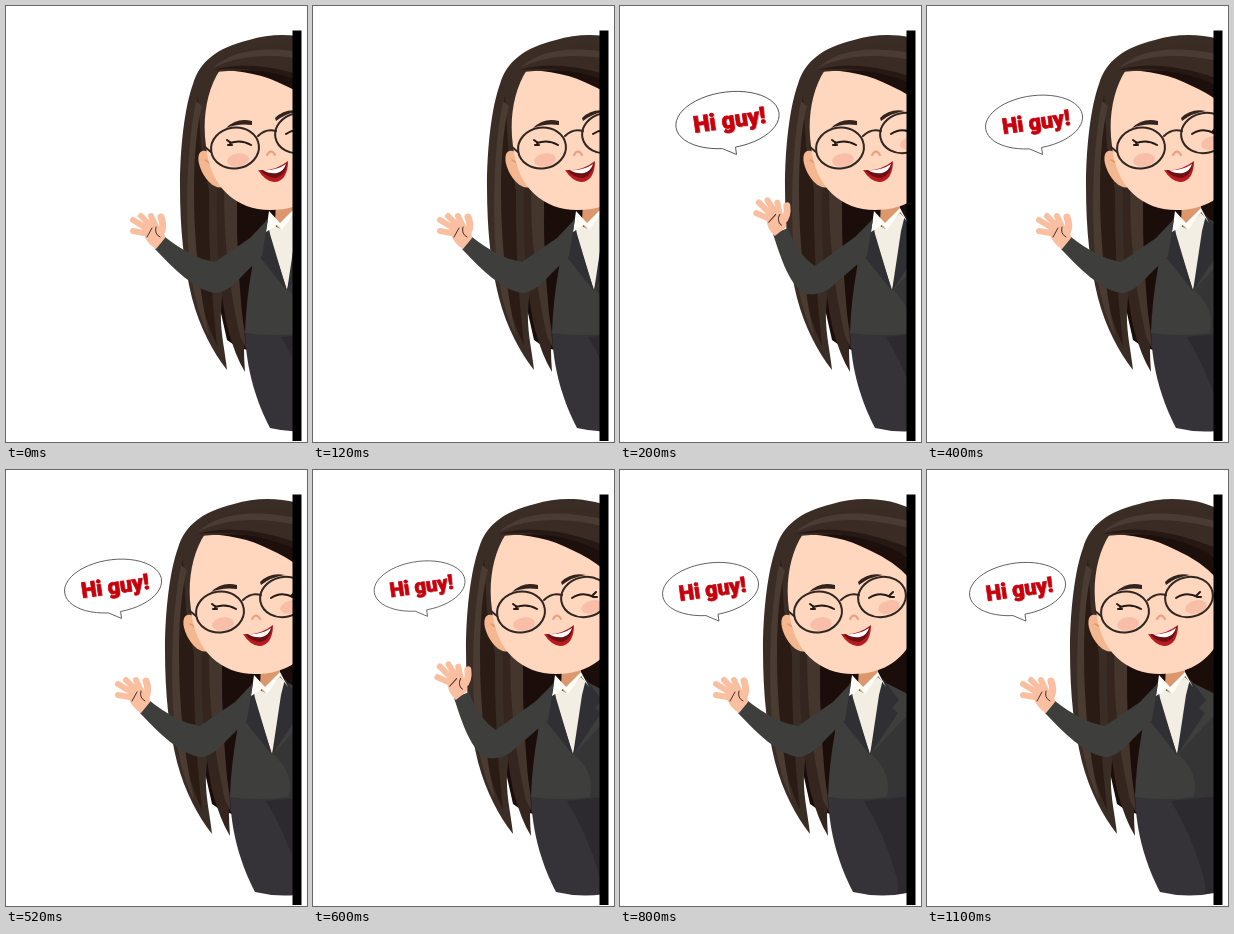
An HTML page for the animation above (1.3 s loop, 301 px wide and 436 px high).

```html
<!DOCTYPE html>
<html lang="en">
<head>
<meta charset="utf-8">
<style>
  html, body { margin: 0; width: 100%; height: 100%; overflow: hidden; background: #fff; }
  svg { display: block; width: 100%; height: 100%; }
  .line { fill: none; stroke-linecap: round; stroke-linejoin: round; }
  text { font: 900 23px Roboto, sans-serif; text-anchor: middle; }
</style>
</head>
<body>
<svg viewBox="0 0 301 436">
  <clipPath id="door"><path d="M0 0H290V436H0Z"/></clipPath>
  <g clip-path="url(#door)">
    <g id="woman">
      <!-- hair behind -->
      <path fill="#1b0e0a" d="M170 110L292 100V300L225 345Q206 347 190 334L160 200Z"/>
      <path fill="#3a2d26" d="M292 40C275 29 240 25 212 34C180 42 163 55 156 78C148 100 143 140 143 180C143 225 147 260 155 292C163 322 176 346 190 364C188 345 183 325 184 305L192 200L172 130L190 66L292 100Z"/>
      <path fill="#2a1b15" d="M161 90C150 140 151 225 161 280Q167 312 180 340Q171 260 172 185L164 140Z"/>
      <path fill="#4a3b33" d="M159 95C150 140 147 210 154 270Q161 310 172 330Q157 260 157 185Q157 130 165 100Z"/>
      <path fill="#34251e" d="M180 180Q178 260 190 320Q198 350 208 366Q206 340 208 325Q193 260 196 190Z"/>
      <path fill="#44352d" d="M187 184Q187 262 203 330L209 342Q199 265 200 195Z"/>

      <!-- skirt -->
      <path fill="#353337" d="M208 325C209 365 220 397 233 422Q262 429 292 422V318Z"/>
      <path fill="#2c2a2e" d="M244 331Q265 365 276 405Q280 417 277 424L292 422V326Z"/>

      <!-- jacket and blouse -->
      <path fill="#3e3e3c" d="M231 213C220 226 217 240 215 262Q209 295 208 327Q250 333 292 322V226L262 211Z"/>
      <path fill="#353536" d="M251 284Q274 305 266 329L292 322V240Z"/>
      <path fill="#dc976d" d="M239 198H258V214L243 228L238 215Z"/>
      <path fill="#f2eee4" d="M232 216L243 223L258 207L267 216L250 284L231 226Z"/>
      <path fill="#303034" d="M230 213L219 241L225 245L222 250L250 285L233 228ZM263 209L279 230L272 238L278 243L250 285L259 225Z"/>
      <path fill="#fffdf7" d="M232 205L229 226L240 219L245 224L258 206L266 217L258 202L243 217Z"/>

      <path id="sleeve" fill="#3e3e3c"/>
      <g id="hand">
        <g class="line" stroke="#f9bfa0" stroke-width="6">
          <path d="M-10 -9L-27 -12M-9 -12L-27 -23M-6 -14L-19 -27M-3 -14L-9 -27"/>
          <path stroke-width="7" d="M0 -9Q5 -16 1 -26"/>
        </g>
        <path fill="#f9bfa0" d="M-4 6Q-14 0 -16 -9Q-12 -19 -3 -18Q5 -12 5 -5Z"/>
        <path class="line" stroke="#47302a" d="M-13 -6L-8 -15M-4 -16Q-6 -9 0 -6"/>
      </g>

      <!-- face -->
      <path fill="#f4b78f" d="M176 150C165 139 158 147 163 161C168 175 178 184 187 181Z"/>
      <path class="line" stroke="#e09870" stroke-width="1.5" d="M168 154Q178 158 181 174"/>
      <path fill="#ffd6be" d="M183 64C170 83 165 113 169 140C173 182 200 204 233 204C264 204 281 190 292 171V100L240 62Z"/>
      <path fill="#1d0f0b" d="M178 64C205 64 228 69 249 80Q276 92 292 111V60L235 54Z"/>
      <path fill="#3a2b25" d="M172 67C190 43 230 33 292 43V92C270 68 225 59 172 67Z"/>
      <path fill="#4a3b34" d="M176 62C196 43 232 37 292 52V59C245 46 205 47 176 62Z"/>
      <path fill="#261914" d="M176 64Q220 50 292 79V89Q240 58 176 64Z"/>

      <g fill="#f8bea8">
        <ellipse cx="201" cy="154" rx="11" ry="6.5" transform="rotate(-8 201 154)"/>
        <ellipse cx="269" cy="137" rx="11" ry="6.5" transform="rotate(-15 269 137)"/>
      </g>
      <path fill="#33231d" d="M189 122Q200 111 215 115L215 119Q201 117 189 122ZM238 112Q248 102 263 105Q249 107 239 115Z"/>
      <g class="line" stroke="#241915" stroke-width="2">
        <path d="M193 137Q204 133 214 139M190 134L194 137M191 139H195M249 128Q259 121 271 127M273 122L269 126M274 127H270"/>
        <g stroke="#302622">
          <ellipse cx="198" cy="142" rx="24" ry="20.5" transform="rotate(-8 198 142)"/>
          <ellipse cx="262" cy="127" rx="24" ry="20" transform="rotate(-12 262 127)"/>
          <path d="M221 130Q229 122 239 125M168 141L174 146"/>
        </g>
        <path stroke="#ed9c7d" d="M230 149Q234 142 238 149"/>
      </g>
      <path fill="#b91a1e" d="M221 164Q237 166 251 155C251 168 246 176 237 176Q228 175 221 164Z"/>
      <path fill="#6c1013" d="M223 164Q237 166 250 157Q248 170 239 172Q230 172 223 164Z"/>
      <path fill="#fff" d="M226 164Q239 165 249 158Q247 165 240 167Q232 168 226 164Z"/>
    </g>
  </g>
  <path d="M286.5 24.5H295.5V435H286.5Z"/>

  <g id="bubble">
    <path fill="#fff" stroke="#444" stroke-width=".9" d="M-6 28.6A52 28 -8 1 1 7 27.1L8 34.5Z"/>
    <g transform="rotate(-8)">
      <text x="2" y="9" fill="#c4bcbc">Hi guy!</text>
      <text x="1" y="8" fill="#c9000c" stroke="#c9000c" stroke-width=".7">Hi guy!</text>
    </g>
  </g>
</svg>
<script>
const $ = id => document.getElementById(id);
const place = (id, value) => $(id).setAttribute('transform', value);

const arms = [
  { sleeve: 'M128 231C145 244 160 253 178 256L213 232L231 213L225 250L205 270Q190 287 178 287C158 284 137 263 118 243Z',
    hand: 'translate(123 237)' },
  { sleeve: 'M146 222Q155 248 173 260L213 231L231 213L225 250L187 283Q176 290 165 288C148 282 139 252 131 228Z',
    hand: 'translate(138 225) rotate(13)' }
];
const slide = [31, 22, 16, 10, 0];
const bubbles = [null, [108.5, 114, 1], [108, 116, .94], [107.5, 116, .88], [91.5, 119, .93]];

function draw(now) {
  const step = Math.min(4, Math.floor(now % 1300 / 200));
  const arm = arms[step % 2], bubble = bubbles[step];
  place('woman', `translate(${slide[step]})`);
  $('sleeve').setAttribute('d', arm.sleeve);
  place('hand', arm.hand);
  $('bubble').style.display = bubble ? '' : 'none';
  if (bubble) place('bubble', `translate(${bubble[0]} ${bubble[1]}) scale(${bubble[2]})`);
}

const start = performance.now();
function loop() {
  draw(performance.now() - start);
  requestAnimationFrame(loop);
}
loop();
</script>
</body>
</html>
```
